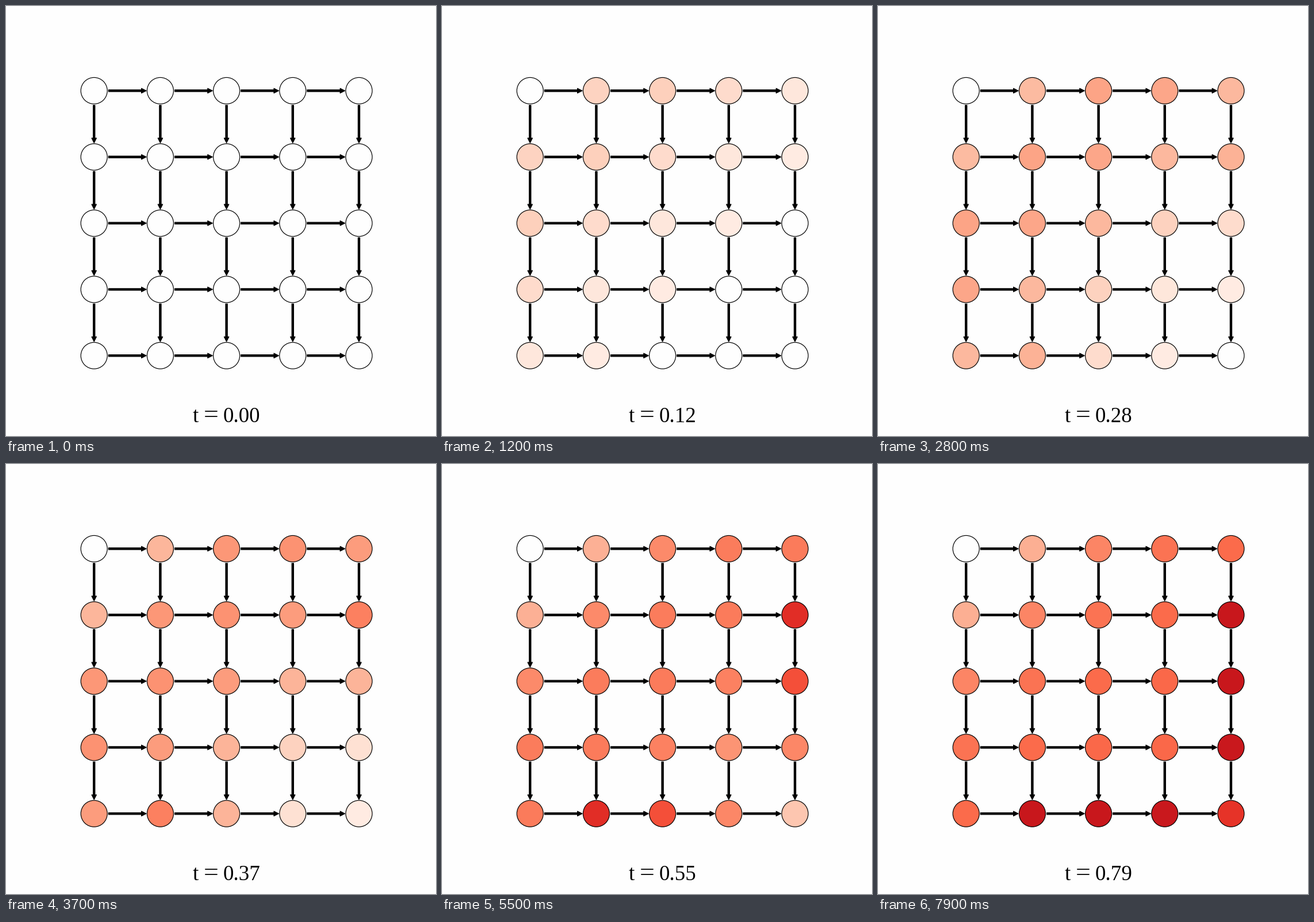
These frames come from a looping animation (748 px wide and 748 px high, 8 s). A matplotlib script:

```python
import numpy as np
import matplotlib.pyplot as plt
from matplotlib.animation import FuncAnimation
from matplotlib.patches import Circle, Polygon

SIZE, DPI = 748, 100
FRAMES, INTERVAL = 80, 100
N, STEP, RADIUS = 5, 115.2, 23
X0, Y0 = 153.2, 147.4
PX = 72 / DPI
PAPER = "#fefefe"


def load(row, col, t):
    """Fill of a node: a front that arrives later and steeper further from the inlet."""
    dist = row + col
    if dist == 0:
        return 0
    jammed = max(row, col) == N - 1 and dist >= N
    level = 0.82 if jammed else 0.53 * (1 - np.exp(-0.78 * dist))
    delay = 8 + 5.2 * dist + 0.34 * dist ** 2
    steepness = 1 + 0.02 * dist ** 2.5
    return min(0.76, level * (1 - np.exp(-(t / delay) ** steepness)))


def color(value):
    return PAPER if value < 0.025 else plt.cm.Reds(max(value, 0.06))


def add_arrow(x, y, vertical):
    tail, neck, tip, w, head = 25.2, 82.4, 90.8, 1.6, 4.2
    pts = np.array([(tail, -w), (neck, -w), (neck, -head), (tip, 0),
                    (neck, head), (neck, w), (tail, w)])
    if vertical:
        pts = pts[:, ::-1]
    ax.add_patch(Polygon(pts + (x, y), fc="black", ec="black",
                         lw=1.2 * PX, joinstyle="round"))


def add_text(x, text, size):
    return ax.text(x, 724, text, family="Liberation Serif", fontsize=size * PX,
                   ha="left", va="baseline")


fig = plt.figure(figsize=(SIZE / DPI, SIZE / DPI), dpi=DPI, facecolor=PAPER)
ax = fig.add_axes([0, 0, 1, 1])
ax.set_xlim(0, SIZE)
ax.set_ylim(SIZE, 0)
ax.axis("off")

nodes = {}
for row in range(N):
    for col in range(N):
        x, y = X0 + col * STEP, Y0 + row * STEP
        if col < N - 1:
            add_arrow(x, y, False)
        if row < N - 1:
            add_arrow(x, y, True)
        nodes[row, col] = ax.add_patch(
            Circle((x, y), RADIUS, fc=PAPER, ec="black", lw=1.2 * PX))

add_text(324.5, "t", 37)
add_text(343.8, "=", 46)
clock = add_text(377.5, "", 37)


def draw(i):
    for (row, col), disc in nodes.items():
        disc.set_facecolor(color(load(row, col, i)))
    clock.set_text(f"{i / 100:.2f}")
    return [*nodes.values(), clock]


anim = FuncAnimation(fig, draw, frames=FRAMES, interval=INTERVAL,
                     repeat=True, repeat_delay=0, blit=False)
plt.show()
```
